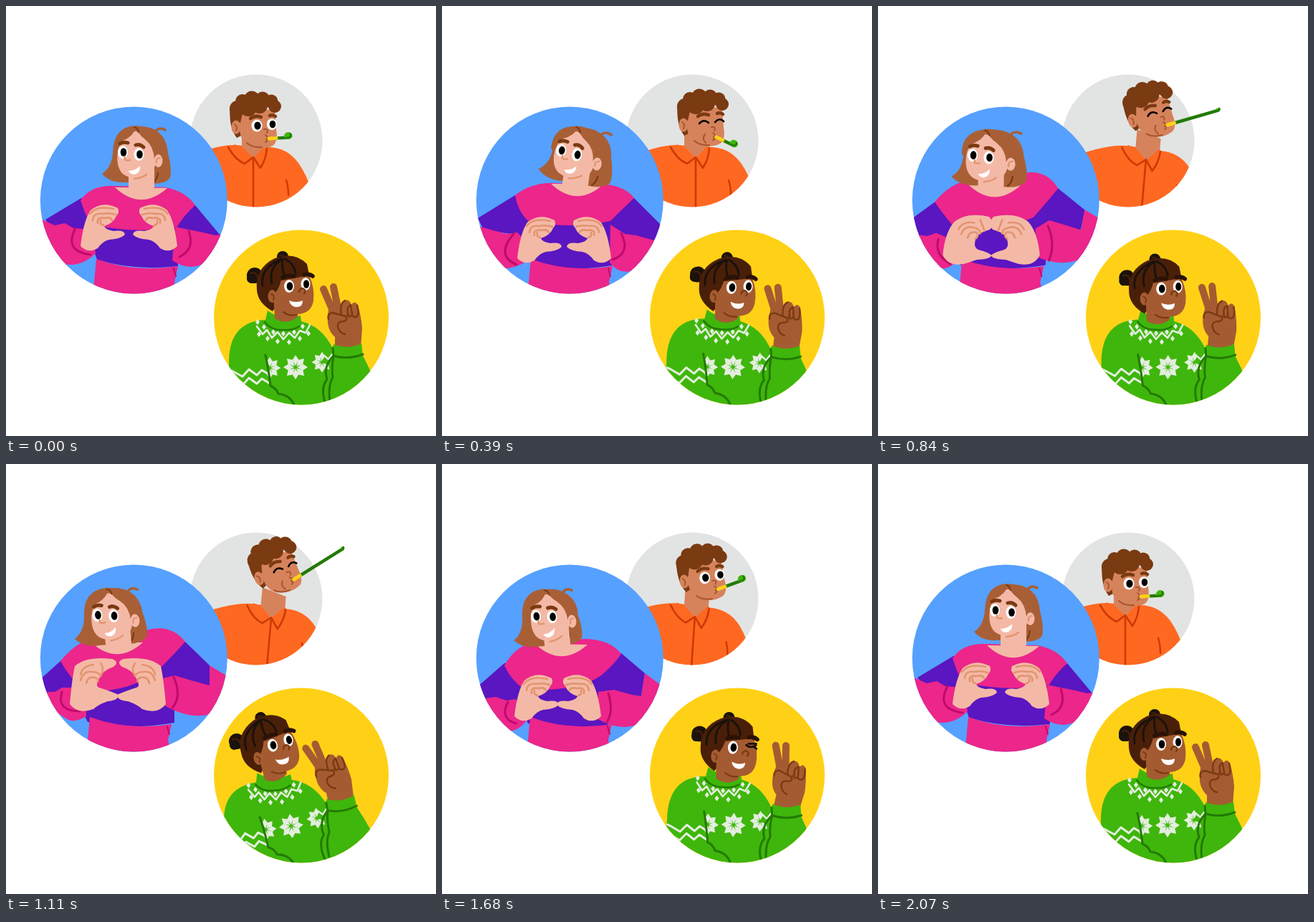
Recreate the animation shown at these times as an HTML page with a canvas. Size 600 by 600 pixels, loop 2.1 s.

```html
<!DOCTYPE html>
<html lang="en">
<head>
<meta charset="utf-8">
<title>Three friends</title>
<style>
html, body { margin: 0; width: 100%; height: 100%; overflow: hidden; background: #fff; }
canvas { display: block; }
</style>
</head>
<body>
<canvas id="stage" width="600" height="600"></canvas>
<script>
const c = document.getElementById('stage').getContext('2d');
const LOOP = 2100, STEP = 30;
const TIMES = [0, 390, 630, 1110, 1440, 1680, 2070];
const NUM = /-?\d+(\.\d+)?/g;
const BROWN = '#7a3a12', PINK = '#ec268a', ROSE = '#bf0a6c', PURPLE = '#5a16c0';
const PEACH = '#f4b9a6', PEACH_LINE = '#e2946f', HAIR = '#a95f36';
const ORANGE = '#ff6821', RUST = '#cc3a05', TAN = '#d6835c', TAN_LINE = '#a9552f';
const GREEN = '#3fb60b', MOSS = '#237a04', SNOW = '#e4eedf';
const SKIN = '#a55b31', YELLOW = '#ffd116', DARK = '#4a1f08', INK = '#1b120c';
let now = 0;

// Smooth, overshoot-free interpolation of six poses; the loop returns to the first.
function key(poses) {
  const rows = [...poses, poses[0]];
  if (now >= TIMES[6]) return rows[0];
  const i = TIMES.findIndex((t, n) => now < TIMES[n + 1]);
  const h = TIMES[i + 1] - TIMES[i], u = (now - TIMES[i]) / h;
  return rows[i].map((a, k) => {
    const rate = n => (rows[n + 1][k] - rows[n][k]) / (TIMES[n + 1] - TIMES[n]);
    const slope = n => {
      if (n === 0 || n === 6) return 0;
      const p = rate(n - 1), q = rate(n);
      return p * q <= 0 ? 0 : 2 * p * q / (p + q);
    };
    const d = rows[i + 1][k] - a, m0 = slope(i) * h, m1 = slope(i + 1) * h;
    return a + u * (m0 + u * (3 * d - 2 * m0 - m1 + u * (m0 + m1 - 2 * d)));
  });
}

// A path whose numbers move between poses.
function morph(...paths) {
  const rows = paths.map(p => p.match(NUM).map(Number));
  return () => {
    const v = key(rows);
    let i = 0;
    return paths[0].replace(NUM, () => v[i++].toFixed(2));
  };
}

function shift(path, dx, dy) {
  let i = 0;
  return path.replace(NUM, n => +n + (i++ % 2 ? dy : dx));
}

function fill(path, color) {
  c.fillStyle = color;
  c.fill(new Path2D(path));
}

function line(path, color, width = 3) {
  c.strokeStyle = color;
  c.lineWidth = width;
  c.stroke(new Path2D(path));
}

function oval(x, y, rx, ry, color) {
  c.fillStyle = color;
  c.beginPath();
  c.ellipse(x, y, rx, ry, 0, 0, 7);
  c.fill();
}

// Draws with the point (ox, oy) moved to (x, y), turned by deg and widened.
function place(x, y, deg, ox, oy, draw, wide = 1) {
  c.save();
  c.translate(x, y);
  c.rotate(deg * Math.PI / 180);
  c.scale(wide, 1);
  c.translate(-ox, -oy);
  draw();
  c.restore();
}

function disc(x, y, r, color, draw) {
  c.save();
  oval(x, y, r, r, color);
  c.clip();
  draw();
  c.restore();
}

function eye(x, y, open = 1, rx = 7, ry = 9) {
  oval(x, y, rx, ry * open, '#fff');
  oval(x + 1, y, rx * .62, ry * .65 * open, '#000');
}

// ---- Man with the party blower ----
function shirt() {
  const [dx, dy, rot] = key([[0, 0, 0], [9, 0, 0], [24, 3, 5], [19, 3, 5], [3, 2, 4], [3, 2, 4]]);
  place(345 + dx, 281 + dy, rot, 345, 281, () => {
    fill('M230 310 L230 222 Q285 194 318 194 L363 197 Q391 196 408 219 Q420 236 428 262 L435 320Z', ORANGE);
    fill('M329 170 L329 198 L345 214 L363 197 L363 180Z', TAN);
    fill('M318 193 L329 196 L345 212 L333 220Z M363 194 L364 202 L355 227 L345 212Z', ORANGE);
    line('M310 197 Q320 215 333 220 L345 211 L355 226 Q363 214 364 198 M345 214 L345 290', RUST, 2.6);
    line('M391 243 Q394 252 394 264', RUST, 2.4);
  });
}

function blower() {
  const [angle, reach, curl] = key([[-3, 18, 5], [26, 17, 5], [10, 53, 2.5], [-15, 70, 2], [-13, 36, 3.5], [-14, 27, 5]]);
  place(365, 185, angle, 0, 0, () => {
    line(`M12 0 L${12 + reach} 0`, MOSS, 4.5);
    oval(11 + reach, -curl / 2, curl * 1.15, curl, GREEN);
    line(`M${8 + reach} 0 Q${16 + reach} 1 ${14 + reach} ${-curl}`, MOSS, 2.5);
    line('M2 0 L12 0', YELLOW, 5);
  });
}

function manHead() {
  const closed = now >= 240 && now < 1290;
  const [x, y, rot] = key([[320, 168, 0], [336, 165, 0], [355, 160, -6], [352, 159, -17], [337, 163, -6], [337, 163, -6]]);
  place(x, y, rot, 320, 168, () => {
    fill('M313 140 Q310 168 322 184 L330 180 L334 140Z', BROWN);
    fill('M326 150 Q350 136 375 148 L377 172 Q380 190 372 195 Q358 202 342 196 Q326 190 326 170Z', TAN);
    const curls = [[323, 143, 11], [330, 133, 10], [343, 129, 10.5], [358, 129, 9.5], [370, 133, 9.5], [375, 140, 9], [354, 139, 11], [338, 142, 12]];
    for (const [cx, cy, r] of curls) oval(cx, cy, r, r, BROWN);
    fill('M312 143 L314 163 L327 163 L330 150Z', BROWN);
    oval(321, 169, 6.5, 9.5, TAN);
    line('M319 165 Q324 168 321 174', TAN_LINE, 2);
    line('M341 157 Q347 152 356 155 M368 153 Q372 151 376 154', BROWN, 4.5);
    if (closed) {
      line('M343 167 Q349 160 356 166 M365 165 Q371 158 377 164', '#000', 2.6);
      line('M351 182 Q346 188 352 194', TAN_LINE, 2);
    } else {
      eye(350, 167, 1, 7.5, 8.5);
      eye(371, 165, 1, 7, 8);
    }
    line('M360 172 Q367 171 364 177 M362 180 Q367 183 363 186 Q367 188 362 190', TAN_LINE, 2);
    line('M336 191 Q344 198 357 197', TAN_LINE, 2.2);
    blower();
  });
}

// ---- Woman making a heart ----
const sleeves = morph(
  'M105 268 L55 298 L66 312 L115 320 L127 354 Q180 370 240 363 L240 320 L285 335 L299 320 L264 278Z',
  'M102 264 L50 296 L58 312 L108 320 L126 358 Q180 372 237 362 L240 320 L295 330 L306 306 L268 268Z',
  'M84 272 L46 296 L52 322 L92 328 L115 362 Q170 372 233 362 L238 320 L282 318 L294 290 L253 262Z',
  'M76 275 L46 302 L56 320 L95 322 L114 360 Q170 372 235 361 L235 320 L284 309 L284 281 L250 248Z',
  'M75 279 L46 306 L58 324 L100 328 L114 362 Q170 372 233 362 L232 320 L284 312 L280 280 L248 248Z',
  'M87 278 L48 312 L60 330 L105 330 L120 362 Q170 374 232 364 L235 320 L278 324 L283 292 L250 264Z');

const yoke = morph(
  'M104 271 Q118 250 150 251 L222 253 Q250 258 264 278 Q250 290 238 309 Q180 318 118 305 Q110 290 104 271',
  'M102 264 Q125 246 155 247 L220 248 Q255 250 268 268 Q250 285 235 300 Q180 312 120 300 Q105 285 102 264',
  'M84 272 Q100 252 122 245 L205 238 Q238 230 253 262 Q240 280 220 302 Q170 310 108 304 Q100 292 84 272',
  'M76 275 Q95 252 115 245 L195 232 Q230 222 250 248 Q235 265 215 285 Q180 318 110 318 Q90 300 76 275',
  'M75 280 Q95 250 110 245 L195 232 Q230 225 248 248 Q235 265 215 285 Q180 318 110 318 Q85 300 75 280',
  'M87 281 Q100 258 122 250 L200 244 Q235 245 250 265 Q240 280 222 295 Q190 318 115 315 Q95 300 87 281');

const leftArm = morph(
  'M46 296 L68 306 L82 303 L94 310 L120 312 L125 345 Q105 365 80 360 L40 350Z',
  'M46 306 L75 314 L90 318 L105 316 L120 330 L120 355 Q100 368 80 366 L40 350Z',
  'M46 318 L70 323 L85 320 L95 328 L115 340 L112 355 Q100 375 85 372 L45 350Z',
  'M46 318 L68 318 L78 312 L92 312 L112 340 L112 352 Q95 362 85 356 L45 330Z',
  'M46 325 L70 322 L85 330 L98 328 L115 345 L115 360 Q95 375 85 368 L45 345Z',
  'M46 329 L75 325 L90 330 L102 328 L118 340 L118 358 Q105 375 90 372 L45 350Z');

const rightArm = morph(
  'M236 308 L255 312 L275 316 L292 320 L299 319 L312 325 L290 350 Q262 375 232 355Z',
  'M235 305 L255 318 L270 320 L300 328 L306 306 L318 318 L290 355 Q255 385 234 358Z',
  'M226 318 L245 305 L268 312 L283 318 L293 289 L318 303 L310 335 Q270 378 226 360Z',
  'M215 300 L235 295 L262 303 L284 309 L284 281 L315 300 L310 335 Q272 368 216 334Z',
  'M216 310 L240 303 L265 312 L284 312 L280 280 L315 302 L310 335 Q270 385 216 352Z',
  'M218 318 L240 315 L265 322 L278 324 L283 292 L318 318 L305 340 Q265 385 216 355Z');

const cuffs = morph(
  'M97 310 Q80 342 118 347 M255 314 Q264 340 242 350',
  'M100 318 Q74 348 104 361 M250 317 Q264 345 238 354',
  'M92 330 Q84 350 100 370 M240 315 Q250 340 243 365',
  'M78 318 Q70 345 103 345 M234 297 Q246 325 232 340',
  'M84 332 Q78 360 98 368 M228 310 Q237 335 232 355',
  'M92 332 Q80 355 103 362 M232 320 Q240 345 230 360');

function handPoses(open, low, high) {
  return morph(open, shift(open, 1, 17), low, high, shift(high, 5, 18), shift(open, -3, 17));
}

const hand = handPoses(
  'M104 335 Q108 300 118 285 Q135 271 156 282 Q159 288 154 293 Q150 303 137 307 Q138 312 150 314 Q165 312 166 319 Q160 325 144 326 Q135 328 128 338 Q115 346 104 335',
  'M93 356 Q96 326 116 314 Q134 300 160 309 Q167 324 160 332 Q155 338 150 334 Q137 338 138 350 Q140 358 150 360 Q161 361 161 366 Q154 370 140 370 Q98 374 93 356'
    .replace('Q154 370 140 370', 'Q156 370 135 370 Q128 372 120 372').replace('Q155 338 150 334 Q137', 'Q137'),
  'M89 335 Q92 300 96 282 Q112 268 148 272 Q159 276 150 283 Q136 288 132 296 Q123 310 130 312 Q146 317 157 322 Q157 330 142 331 Q128 336 122 342 Q100 350 89 335');

const fingers = handPoses(
  'M117 290 Q126 278 150 283 M121 299 Q122 288 134 290 Q144 288 153 291 M128 303 Q126 294 138 296 Q146 294 148 299 M136 306 Q130 304 132 299',
  'M118 324 Q126 312 146 318 M124 330 Q130 318 142 322 Q152 326 152 332 M134 336 Q136 326 146 328 Q150 334 144 340 M160 326 Q152 322 150 314',
  'M104 294 Q106 282 122 280 M104 302 Q108 288 120 290 Q130 290 132 296 M112 306 Q114 296 124 298 Q130 300 128 304 M132 296 Q138 286 132 278');

function drawHand() {
  fill(hand(), PEACH);
  line(fingers(), PEACH_LINE, 2.6);
}

function womanHead() {
  const [x, y, rot, sway, wide] = key([
    [174.5, 205.5, 0, 0, 1], [177.5, 204.5, 8, 4, 1.07], [150, 208, 6, 8, 1.12],
    [139, 211.5, -5, -3, 1.06], [136.5, 212.5, -5, -3, 1.06], [142.5, 213, -6, -5, 1]]);
  place(x, y, rot, 174.5, 205.5, () => {
    place(174.5 + sway, 0, 0, 174.5, 0, () => {
      fill('M181 167 Q150 168 149 205 Q147 226 134 234 Q146 248 168 246 L206 248 Q222 248 229 240 Q232 228 226 205 Q224 176 198 169Z', HAIR);
      line('M206 179 Q212 167 222 173', HAIR, 3.5);
      line('M212 233 Q211 242 206 246', BROWN, 2.2);
    }, wide);
    fill('M171 232 L171 254 Q189 266 207 253 L207 225Z', PEACH);
    place(174.5, 0, 0, 174.5, 0, () => {
      fill('M177 174 Q158 184 156 203 Q153 226 164 235 Q176 243 192 239 Q206 234 208 222 L211 200 Q200 178 177 174Z', PEACH);
      fill('M182 168 Q182 177 195 187 Q206 196 207 214 L222 206 Q222 172 182 168Z M182 168 Q178 182 163 188 Q156 196 155 210 L150 202 Q150 169 182 168Z', HAIR);
      oval(212.5, 216, 6, 9, PEACH);
      line('M210 219 Q209 212 215 212', PEACH_LINE, 2.2);
      line('M179 169 Q184 170 185 176', BROWN, 2);
    }, wide);
    line('M159 192 Q164 189 170 191 M181 194 Q187 192 192 197', BROWN, 5);
    eye(163, 204);
    eye(185.5, 207);
    line('M166 211 Q164 217 173 215', PEACH_LINE, 2.4);
    fill('M171 230 Q181 230 187 223 Q188 233 179 235 Q173 235 171 230Z', '#fff');
    line('M179 241 Q190 240 196 235', PEACH_LINE, 2.4);
  });
}

function woman() {
  const [hips, neckX, neckY, axis] = key([
    [0, 188, 253, 171.5], [-2, 188, 248, 170.5], [-8, 173, 250, 161.5],
    [-9, 154, 248, 156], [-9, 154, 248, 157], [-3, 166, 251, 161.5]]);
  fill(sleeves(), PURPLE);
  fill(shift('M126 353 Q180 373 240 363 L235 385 L240 410 L118 410 L123 385Z', hips, 0), PINK);
  line(shift('M234 366 L237 377', hips, 0), ROSE, 2);
  fill(yoke(), PINK);
  fill(leftArm(), PINK);
  fill(rightArm(), PINK);
  line(cuffs(), ROSE, 3);
  fill(shift('M-36 0 Q0 34 37 1Z', neckX, neckY), PEACH);
  womanHead();
  drawHand();
  c.save();
  c.translate(2 * axis, 0);
  c.scale(-1, 1);
  drawHand();
  c.restore();
}

// ---- Woman in the knitted sweater ----
function flake(x, y, size, from = 0, to = 7) {
  for (let i = from; i <= to; i++)
    place(x, y, i * 45, 0, 0, () => {
      c.scale(size, size);
      fill('M0 -2 L4.5 -10 L0 -17 L-4.5 -10Z', SNOW);
    });
}

function knit() {
  line('M350 447 L358 458 L364 452 L371 463 L379 455 L387 465 L395 456 L403 463 L410 453 L418 456 L424 445', SNOW, 2.6);
  const gems = [[351, 441], [360, 448], [373, 455], [387, 457], [402, 455], [414, 447], [353, 458], [365, 464], [379, 468], [395, 469], [410, 464], [422, 457]];
  for (const [x, y] of gems) fill(shift('M0 -4 L3 0 L0 4 L-3 0Z', x, y), SNOW);
  const wave = 'M312 508 L317 510 L330 517 L339 507 L350 515 L357 508 L367 514';
  line(wave, SNOW, 3);
  line(shift(wave, 0, 12), SNOW, 3);
  flake(404, 504, 1);
  flake(368, 505, .9, 0, 4);
  flake(441, 497, .85, 3, 8);
  line('M443 487 L450 493 L455 486', SNOW, 2.5);
}

function vSign(turn) {
  place(477, 475, turn, 477, 475, () => {
    line('M443 395 L459 432 M457 392 L465 430', SKIN, 10);
    fill('M450 424 Q445 450 459 462 L459 478 Q477 484 495 476 L497 450 Q496 435 491 417 Q486 410 482 417 Q478 406 469 413 L463 424Z', SKIN);
    line('M450 437 Q448 429 456 428 L474 433 Q478 438 471 440 Q462 440 463 448 Q465 456 473 458', BROWN, 2.4);
    line('M468 431 Q465 415 473 411 M478 432 Q474 420 481 417 L483 431 Q479 436 476 431 M490 418 Q494 434 487 434 Q482 434 483 428', BROWN, 2.4);
  });
}

function sweater() {
  const [rot, turn] = key([[0, 0], [2, 4], [5.3, 12], [-6.3, -5], [-2, 3], [2.8, 10]]);
  place(412, 560, rot, 412, 560, () => {
    vSign(turn);
    fill('M292 590 Q312 530 311 495 Q312 440 362 438 L365 425 Q384 440 411 432 L412 440 Q441 447 456 478 L457 472 Q477 480 496 471 L498 488 Q506 503 513 520 L500 590Z', GREEN);
    knit();
    line('M361 441 Q370 453 387 452 Q401 453 409 447', MOSS, 2.4);
    line('M362 487 Q367 510 369 530 Q377 533 380 541 Q399 543 404 562', MOSS);
    line('M456 477 L457 488 Q442 503 448 521 Q438 533 446 556 M457 489 Q454 503 456 518 Q449 530 452 552', MOSS);
    line('M457 488 Q477 494 498 486', MOSS);
  });
}

function bun(x, y, r) {
  oval(x, y, r, r, INK);
  oval(x - r * .4, y + r * .4, r * .6, r * .6, INK);
  line(`M${x - r * .5} ${y - r * .3} Q${x + r * .3} ${y - r * .5} ${x + r * .4} ${y + r * .4}`, DARK, 2);
}

function knitHead() {
  const [x, y, rot] = key([[406, 389.5, 0], [415, 392, 4], [422.5, 396, 8], [382.5, 389, -11], [399, 391, -2], [417, 395, 5]]);
  const blink = Math.min(1, .1 + Math.abs(now - 690) / 130);
  const wink = now >= 1350 && now < 1800;
  place(x, y, rot, 406, 389.5, () => {
    bun(386, 350, 8);
    bun(347, 376, 11);
    fill('M350 396 Q347 366 375 352 Q403 342 420 360 L424 380 L390 400 L372 426 Q351 414 350 396Z', DARK);
    fill('M373 400 L375 436 Q390 446 407 434 L408 420Z', SKIN);
    fill('M379 384 L423 376 Q431 393 429 411 Q426 430 405 430 Q386 428 377 416 L373 402Z', SKIN);
    fill('M365 395 Q362 358 390 351 Q419 350 424 379 Q411 372 400 375 L384 381 Q382 393 375 401Z', DARK);
    oval(371.5, 405, 6, 9, SKIN);
    line('M370 402 Q376 404 373 410', BROWN, 2);
    line('M358 390 Q354 366 384 353 M371 387 Q366 366 384 354 M389 379 Q384 364 386 353 M404 373 Q402 359 389 353', INK, 3);
    line('M386 379 Q393 375 402 377 M416 375 Q423 373 428 377', '#2a1207', 5.5);
    eye(395, 391, blink, 7, 9);
    if (wink) line('M413 386 Q420 391 427 385 M425 388 L428 390 M416 384 L427 383', INK, 2.7);
    else eye(418, 388, blink, 6.5, 9);
    line('M409 399 Q409 395 414 394 Q420 397 416 401', BROWN, 2.4);
    fill('M395 411 Q405 415 414 411 Q414 421 404 420 Q397 419 395 411Z', '#fff');
    line('M387 427 Q395 433 405 431', BROWN, 2.2);
  });
}

function frame() {
  now = Math.floor(performance.now() % LOOP / STEP) * STEP;
  c.fillStyle = '#fff';
  c.fillRect(0, 0, 600, 600);
  disc(349, 188, 92.5, '#e2e4e3', shirt);
  manHead();
  disc(178.3, 271, 130.5, '#56a0ff', woman);
  disc(412, 434.5, 122, YELLOW, () => {
    sweater();
    knitHead();
  });
  requestAnimationFrame(frame);
}

c.lineCap = c.lineJoin = 'round';
frame();
</script>
</body>
</html>
```
